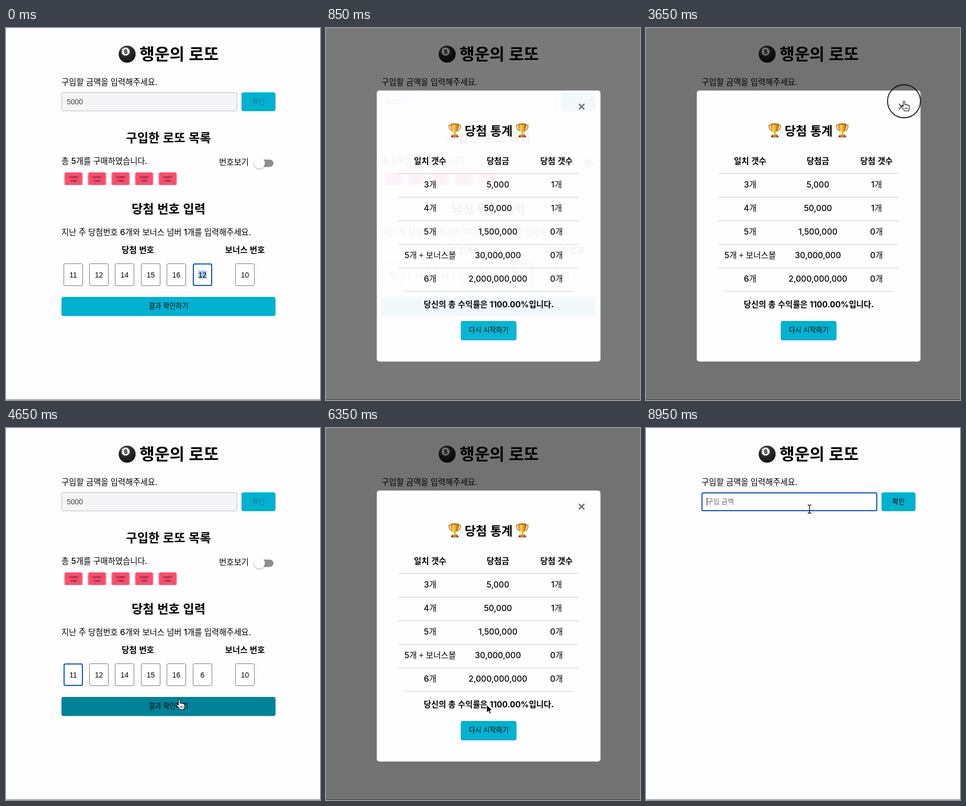
Animation, 600 px wide and 711 px high, one loop 9 s. Source, as an HTML page:

```html
<!DOCTYPE html>
<html lang="ko">
<head>
<meta charset="utf-8">
<style>
  html, body { margin: 0; width: 100%; height: 100%; overflow: hidden; background: #fefdff; }
  svg { display: block; width: 600px; height: 711px; }
  text { font-family: "Noto Sans CJK KR", "Noto Sans CJK", sans-serif; font-weight: 500; white-space: pre; }
  .num { font-family: Inter, "Noto Sans", sans-serif; }
  .field { font-family: "Liberation Sans", Arial, sans-serif; font-weight: 400; }
  .bold { font-weight: 700; }
</style>
</head>
<body>
<svg viewBox="0 0 600 711">
  <defs>
    <radialGradient id="ballFill" cx=".42" cy=".3" r=".75">
      <stop offset="0" stop-color="#555"/><stop offset=".5" stop-color="#26272a"/><stop offset="1" stop-color="#08090b"/>
    </radialGradient>
    <linearGradient id="gold">
      <stop offset="0" stop-color="#b9730c"/><stop offset=".35" stop-color="#ffd65a"/><stop offset=".6" stop-color="#eda31b"/><stop offset="1" stop-color="#9b5a08"/>
    </linearGradient>
    <filter id="soft" x="-50%" y="-50%" width="200%" height="200%">
      <feDropShadow dx="0" dy="1.2" stdDeviation="1.4" flood-opacity=".4"/>
    </filter>
    <g id="ticket">
      <rect x="2" width="32" height="24" rx="1.5" fill="#f8506d"/>
      <path d="M2 2V23M34 2V23" stroke="#f8506d" stroke-width="3.4" stroke-dasharray="2.6 1.2"/>
      <path d="M6.5 1V23M29.5 1V23" stroke="#d93a59" stroke-width=".8" stroke-dasharray="1.5 1"/>
    </g>
    <g id="trophy">
      <path d="M-6-10H-11C-11-3-8 0-4 1M6-10H11C11-3 8 0 4 1" fill="none" stroke="#d08d1b" stroke-width="2"/>
      <path d="M-8-13H8C8-3 5 2 1.8 3.5V7H4L5 9H-5L-4 7H-1.8V3.5C-5 2-8-3-8-13Z" fill="url(#gold)"/>
      <ellipse cy="-12.4" rx="8" ry="1.3" fill="#a96a0d"/>
      <path d="M-6 9H6L7.5 13H-7.5Z" fill="#8a3d1c"/>
      <rect x="-3.5" y="9.8" width="7" height="2" fill="#e5b347"/>
    </g>
  </defs>
  <g id="page"></g>
  <g id="modal"></g>
  <circle id="ring" r="31.5" fill="none" stroke="#111" stroke-width="1.8"/>
  <g id="cursor" stroke-linejoin="round">
    <path id="arrow" d="M0 0V15L3.6 11.7 6 17.2 8.4 16.1 6 10.8H10.8Z" fill="#000" stroke="#fff"/>
    <g id="hand" stroke="#000" stroke-width="1.1">
      <path fill="#fff" d="M-1.6 1.2C-1.6-.8 1.6-.8 1.6 1.2V7C2 5.6 4.6 5.6 4.8 7.2 5.4 6.2 7.6 6.6 7.7 8 8.6 7.3 10.4 7.8 10.4 9.4V13C10.4 15 9 16 9 18.5H.5C.5 16-2.5 14-5 10.5-5.6 9-4 8-2.8 9L-1.6 10.4Z"/>
      <path d="M2 12V15.5M4.5 12V15.5M7 12V15.5" stroke-width=".9"/>
    </g>
    <path id="beam" d="M-3.5-8Q-.5-8 0-6Q.5-8 3.5-8M0-6V6M-3.5 8Q-.5 8 0 6Q.5 8 3.5 8M-2 3H2" fill="none" stroke="#111" stroke-width="1.4"/>
  </g>
</svg>
<script>
const LOOP = 9000, TEAL = '#00b1d0', TEAL_DARK = '#008298', BLUE = '#0b50bb';
const $ = id => document.getElementById(id);

function add(parent, tag, attrs = {}) {
  const node = document.createElementNS('http://www.w3.org/2000/svg', tag);
  for (const key in attrs) node.setAttribute(key, attrs[key]);
  return parent.appendChild(node);
}

// y is the visual middle of the line
function label(parent, str, x, y, size, attrs = {}) {
  const text = add(parent, 'text', { x, y: y + size * .37, 'font-size': size, ...attrs });
  const plain = (attrs.class || '').includes('field');
  for (const part of str.split(/(\d[\d,.%]*)/)) {
    if (part) add(text, 'tspan', /^\d/.test(part) && !plain ? { class: 'num' } : {}).textContent = part;
  }
  return text;
}
const mid = { 'text-anchor': 'middle' };
const bold = { ...mid, class: 'bold' };
const boldField = { ...mid, class: 'field bold' };
const box = (parent, x, y, width, height, rx, attrs) => add(parent, 'rect', { x, y, width, height, rx, ...attrs });
const show = (node, on) => node.setAttribute('visibility', on ? 'inherit' : 'hidden');

// A field whose border lies inside its box
function field(parent, x, y, width, height, fill) {
  const node = box(parent, x, y, width, height, 2.5, { fill });
  node.setBorder = (color, line) => {
    const place = { x: x + line / 2, y: y + line / 2, width: width - line, height: height - line, stroke: color, 'stroke-width': line };
    for (const key in place) node.setAttribute(key, place[key]);
  };
  return node;
}
const focusBorder = (node, on, color) => on ? node.setBorder(BLUE, 2) : node.setBorder(color, 1);

// Page
const page = $('page');
box(page, 0, 0, 600, 711, 0, { fill: '#fefdff' });
box(page, 0, 710, 600, 1, 0, { fill: '#777' });
add(page, 'circle', { cx: 231.5, cy: 50, r: 16.2, fill: 'url(#ballFill)' });
add(page, 'circle', { cx: 228.5, cy: 45, r: 7.8, fill: '#f4f4f4' });
label(page, '8', 228.5, 45, 12, { ...boldField, transform: 'rotate(-12 228.5 45)' });
label(page, '행운의 로또', 331, 50, 31, bold);
label(page, '구입할 금액을 입력해주세요.', 106, 103.5, 15.45);
const amountBox = field(page, 106, 123, 336, 36);
const amount = label(page, '5000', 116, 140.5, 14, { class: 'field', fill: '#444' });
const placeholder = label(page, '구입 금액', 116.5, 140.5, 13, { fill: '#6b6b6b' });
const caret = box(page, 116, 133, 1.1, 15, 0, { fill: '#111' });
box(page, 450, 123, 65, 36, 4, { fill: TEAL });
const confirmText = label(page, '확인', 482.5, 140.5, 13, mid);

// Purchased tickets and winning numbers
const details = add(page, 'g');
label(details, '구입한 로또 목록', 310.5, 209.5, 23.2, bold);
label(details, '총 5개를 구매하였습니다.', 106, 254.5, 15.4);
label(details, '번호보기', 407, 256.5, 15.5);
box(details, 480, 251.5, 31, 14, 7, { fill: '#8d8c8e' });
add(details, 'circle', { cx: 484.5, cy: 258.5, r: 10.3, fill: '#fff', filter: 'url(#soft)' });
for (let i = 0; i < 5; i++) {
  const x = 111 + i * 45;
  add(details, 'use', { href: '#ticket', x, y: 276 });
  ['ADMIT', 'ONE'].forEach((word, row) =>
    label(details, word, x + 18, 285 + row * 6.6, 5.9, { ...boldField, fill: '#7a1d35' }));
}
label(details, '당첨 번호 입력', 310.5, 345.5, 23.2, bold);
label(details, '지난 주 당첨번호 6개와 보너스 넘버 1개를 입력해주세요.', 106, 390.5, 15.4);
label(details, '당첨 번호', 252, 424, 15.6, bold);
label(details, '보너스 번호', 456.5, 424, 15.6, bold);

const cells = [11, 12, 14, 15, 16, 12, 10].map((value, i) => {
  const x = i < 6 ? Math.floor(110 + i * 49.4) : 438;
  const frame = field(details, x, 450, 37, 43, '#fff');
  const mark = i === 5 && box(details, x + 10, 463.5, 16.4, 15.5, 0, { fill: '#a6cdf7' });
  const text = label(details, String(value), x + 18.5, 471.5, 14, { ...mid, class: 'field' });
  return { frame, mark, text };
});
const resultButton = box(details, 106, 514, 409, 36.5, 4);
label(details, '결과 확인하기', 310.5, 531.5, 13.1, mid);

// Modal: the backdrop and the card fade as one layer
const modal = $('modal');
box(modal, 0, 0, 600, 711, 0, { fill: '#000', 'fill-opacity': .55 });
box(modal, 97, 119.5, 427.5, 518, 5, { fill: '#fefdff' });
add(modal, 'path', { d: 'M483.3 145L493.7 155.4M493.7 145L483.3 155.4', stroke: '#636264', 'stroke-width': 2.3 });
for (const x of [246, 375]) add(modal, 'use', { href: '#trophy', x, y: 196 });
label(modal, '당첨 통계', 310.8, 196, 23.2, bold);
const rows = [
  ['일치 갯수', '당첨금', '당첨 갯수'],
  ['3개', '5,000', '1개'],
  ['4개', '50,000', '1개'],
  ['5개', '1,500,000', '0개'],
  ['5개 + 보너스볼', '30,000,000', '0개'],
  ['6개', '2,000,000,000', '0개']
];
rows.forEach((row, r) => {
  const y = 254.5 + r * 45;
  row.forEach((str, c) => label(modal, str, [199, 328.5, 440.5][c], y, 15.6, r ? mid : bold));
  const inset = r === 5 ? 12 : 0;
  box(modal, 138 + inset, y + 23.5, 345 - inset * 2, 1, 0, { fill: '#cccbcd' });
});
label(modal, '당신의 총 수익률은 1100.00%입니다.', 311, 528.5, 15.4, bold);
const restartButton = box(modal, 257.5, 560, 106.5, 37, 4);
label(modal, '다시 시작하기', 311, 577.5, 13.1, mid);

// Motion
const TYPED = 250, RESET = 7700, FADE = 400;
const fades = [[560, 1], [3820, 0], [4950, 1], [RESET, 0]];
const clicks = [[3620, 3900], [4800, 4980], [7500, 7760]];
const path = [
  [2250, 586, 300], [2850, 500, 165], [3200, 493, 140], [3950, 493, 140],
  [4600, 331, 519.5], [4680, 331, 519.5], [4800, 307, 529], [6680, 307, 529],
  [7100, 301.5, 580.5], [7950, 301.5, 580.5], [8450, 312.5, 155], [LOOP, 312.5, 155]
];

// cubic-bezier(.25, .1, .25, 1)
function ease(x) {
  if (x <= 0 || x >= 1) return x <= 0 ? 0 : 1;
  const curve = (s, a, b) => 3 * a * s * (1 - s) ** 2 + 3 * b * s * s * (1 - s) + s ** 3;
  let low = 0, high = 1;
  for (let i = 0; i < 18; i++) {
    const s = (low + high) / 2;
    if (curve(s, .25, .25) < x) low = s; else high = s;
  }
  return curve(low, .1, 1);
}

function modalOpacity(t) {
  let value = 0;
  for (const [start, goal] of fades) value += (goal - value) * ease((t - start) / FADE);
  return value;
}

function pointer(t) {
  const i = path.findIndex(point => t < point[0]);
  const [t0, x0, y0] = path[i - 1] || path[0];
  const [t1, x1, y1] = path[i];
  const k = i ? (1 - Math.cos(Math.PI * (t - t0) / (t1 - t0))) / 2 : 0;
  return [x0 + (x1 - x0) * k, y0 + (y1 - y0) * k];
}

function render(t) {
  const fresh = t >= RESET, typed = t >= TYPED;
  const opacity = modalOpacity(t);
  const [x, y] = pointer(t);

  show(details, !fresh);
  show(amount, !fresh);
  show(placeholder, fresh);
  show(caret, fresh && (t - RESET) % 1000 < 500);
  amountBox.setAttribute('fill', fresh ? '#fff' : '#f5f4f6');
  focusBorder(amountBox, fresh, '#bdbcbe');
  confirmText.setAttribute('fill', fresh ? '#000' : '#27798a');

  const focused = t < 3820 ? 5 : t < 4850 ? 0 : -1;
  cells.forEach((cell, i) => focusBorder(cell.frame, i === focused, '#767577'));
  show(cells[5].mark, !fresh && !typed);
  cells[5].text.firstChild.textContent = typed ? '6' : '12';

  const overResult = t > 4000 && t < 5350 && y > 514 && y < 551;
  const overRestart = t > 6600 && t < 8100 && y > 560;
  const overClose = t > 2900 && t < 4050 && y < 158;
  const overInput = t > 8000 && y < 159;
  resultButton.setAttribute('fill', overResult ? TEAL_DARK : TEAL);
  restartButton.setAttribute('fill', overRestart ? TEAL_DARK : TEAL);

  modal.setAttribute('opacity', opacity);
  show(modal, opacity > .002);

  const hand = overResult || overRestart || overClose;
  $('cursor').setAttribute('transform', `translate(${x} ${y})`);
  show($('cursor'), t >= path[0][0]);
  show($('hand'), hand);
  show($('beam'), overInput);
  show($('arrow'), !hand && !overInput);
  $('ring').setAttribute('transform', `translate(${x} ${y})`);
  show($('ring'), clicks.some(([from, to]) => t >= from && t < to));
}

function tick() {
  render(performance.now() % LOOP);
  requestAnimationFrame(tick);
}
tick();
</script>
</body>
</html>
```
